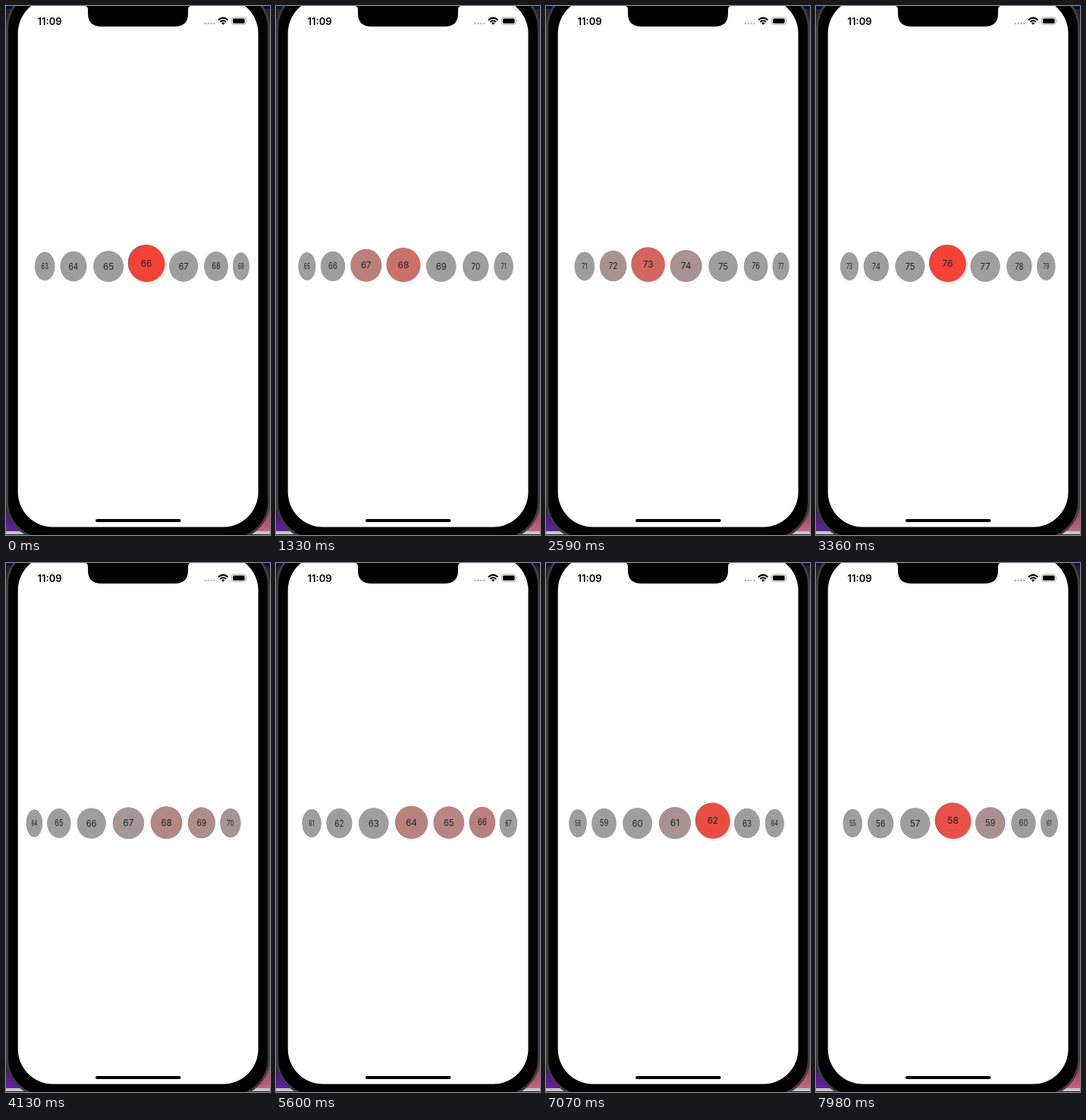
Recreate the animation shown at these times as an HTML page. Size 348 px wide and 696 px high, loop 8000 ms.

```html
<!DOCTYPE html>
<html lang="en">
<head>
<meta charset="utf-8">
<title>Wheel picker</title>
<style>
  html, body { margin: 0; width: 100%; height: 100%; overflow: hidden; background: #1c1c1f; }
  svg { display: block; width: 100vw; height: 100vh; }
  text { font-family: Inter, Roboto, sans-serif; }
  .ball text { font-size: 12px; text-anchor: middle; fill: #222; }
  .glow { fill: #e8d8d5; filter: blur(1.5px); }
</style>
</head>
<body>
<svg viewBox="0 0 348 696" xmlns="http://www.w3.org/2000/svg">
  <defs>
    <linearGradient id="purple" x2="0" y2="1">
      <stop offset="0" stop-color="#2c1646"/><stop offset="1" stop-color="#6420a4"/>
    </linearGradient>
    <linearGradient id="pink" x2="0" y2="1">
      <stop offset="0" stop-color="#50313f"/><stop offset="1" stop-color="#c8647e"/>
    </linearGradient>
  </defs>

  <!-- desktop behind the phone -->
  <rect width="348" height="696" fill="#222224"/>
  <rect width="348" height="4" fill="#0b0b50"/>
  <rect y="650" width="40" height="41" fill="url(#purple)"/>
  <rect x="308" y="640" width="40" height="51" fill="url(#pink)"/>
  <rect y="691" width="348" height="4" fill="#c9c4cc"/>

  <!-- phone -->
  <rect x="1.5" y="-20" width="345" height="721" rx="49" fill="#000" stroke="#3d3d3e" stroke-width="3"/>
  <rect x="15.7" y="-10" width="316.8" height="695.5" rx="46" fill="#fff"/>
  <path d="M104 0Q108 0 108 5V10Q108 27 126 27H222Q240 27 240 10V5Q240 0 244 0Z"/>
  <text x="41.5" y="24.5" font-size="13" font-weight="600">11:09</text>
  <g fill="#b8b8b8">
    <circle cx="262.7" cy="23" r="1.3"/><circle cx="266.6" cy="23" r="1.3"/>
    <circle cx="270.5" cy="23" r="1.3"/><circle cx="274.4" cy="23" r="1.3"/>
  </g>
  <g fill="none" stroke="#000" stroke-width="2">
    <path d="M279.9 18.4Q286.2 12.8 292.5 18.4"/>
    <path d="M282.3 21Q286.2 17.6 290.1 21"/>
  </g>
  <path d="M283.9 22.4Q286.2 20.6 288.5 22.4L286.2 24.8Z"/>
  <rect x="297.5" y="15" width="18.6" height="9.4" rx="2.8" fill="none" stroke="#a5a5a5"/>
  <rect x="299" y="16.5" width="15.6" height="6.4" rx="1.6"/>
  <path d="M317.2 18.2Q318.8 19.7 317.2 21.2Z" fill="#a5a5a5"/>
  <rect x="118" y="675" width="112.5" height="4" rx="2"/>

  <g id="wheel"></g>
</svg>
<script>
const LOOP = 8000, TICK = 70, FADE = 300;
const CENTER_X = 174, CENTER_Y = 342.5, RADIUS = 160, ANGLE = 0.315, REACH = 3.64;
const GREY = [158, 158, 158], RED = [244, 67, 54];
const SHADE = [158, 158, 158], DARK = [118, 104, 102];

// [time, item position at the middle of the wheel]
const path = [
  [0, 65.78], [630, 65.78], [980, 66.5], [1180, 67.5], [1330, 68.12],
  [1470, 68.5], [1800, 69.5], [1980, 70.5], [2145, 71.5], [2345, 72.5],
  [2555, 73.5], [2590, 73.79], [2870, 75], [3150, 75.8], [3450, 76.1],
  [3600, 74.6], [3690, 72.7], [4130, 67.25], [4230, 66.65], [4410, 66.4],
  [4830, 66.2], [5250, 66.2], [5393, 65.5], [5507, 64.5], [5600, 63.91],
  [5880, 63.1], [6160, 62.5], [6440, 62.05], [6790, 61.8], [6860, 61.8],
  [7034, 61.5], [7070, 61.08], [7190, 60.5], [7445, 59.5], [7720, 58.5],
  [7980, 57.87], [LOOP, 57.87]
];

function position(t) {
  const i = Math.max(1, path.findIndex(p => p[0] >= t));
  const [t0, a] = path[i - 1], [t1, b] = path[i];
  return a + (b - a) * (t - t0) / (t1 - t0);
}

// Each item fades linearly to its new state whenever the selection changes.
const fades = {};

function level(item, t) {
  const f = (fades[item] || []).findLast(f => f.start <= t);
  return f ? f.from + (f.to - f.from) * Math.min(1, (t - f.start) / FADE) : 0;
}

function fadeTo(item, to, start, from = level(item, start)) {
  (fades[item] ||= []).push({ start, from, to });
}

let selected = Math.round(position(0));
fadeTo(selected, 1, 0, 1);
for (let t = 0; t < LOOP; t += 5) {
  const next = Math.round(position(t));
  if (next === selected) continue;
  fadeTo(selected, 0, t);
  fadeTo(next, 1, t);
  selected = next;
}

const wheel = document.getElementById('wheel');

function add(parent, tag, className) {
  const node = document.createElementNS('http://www.w3.org/2000/svg', tag);
  if (className) node.setAttribute('class', className);
  return parent.appendChild(node);
}

function set(node, attrs) {
  for (const key in attrs) node.setAttribute(key, attrs[key]);
}

const balls = Array.from({ length: 8 }, () => {
  const group = add(wheel, 'g', 'ball');
  return {
    group,
    glow: add(group, 'circle', 'glow'),
    rim: add(group, 'circle'),
    face: add(group, 'circle'),
    label: add(group, 'text')
  };
});

const mix = (a, b, k) => `rgb(${a.map((v, i) => Math.round(v + (b[i] - v) * k))})`;

function drawBall(ball, item, offset, k) {
  const angle = offset * ANGLE, cos = Math.cos(angle);
  const x = CENTER_X + RADIUS * Math.sin(angle);
  const lift = -4 * k, r = 20.5 + 3.4 * k;
  set(ball.group, {
    transform: `translate(${x} ${CENTER_Y}) scale(${cos} ${0.75 + 0.25 * cos})`,
    visibility: 'visible'
  });
  set(ball.glow, { cx: 2 * k, cy: lift + 2.8 * k, r, opacity: Math.min(1, k * 2) });
  set(ball.rim, { cx: -0.6 * k, cy: lift - 0.6 * k, r, fill: mix(SHADE, DARK, k) });
  set(ball.face, { cx: 0.5 * k, cy: lift + 0.6 * k, r, fill: mix(GREY, RED, k) });
  set(ball.label, { y: lift + 4.2 });
  ball.label.textContent = item;
}

function draw(time) {
  const t = Math.floor(time % LOOP / TICK) * TICK;
  const middle = position(t);
  const first = Math.floor(middle - REACH + 1), last = Math.floor(middle + REACH);
  balls.forEach((ball, i) => {
    const item = first + i;
    if (item > last) set(ball.group, { visibility: 'hidden' });
    else drawBall(ball, item, item - middle, level(item, t));
  });
}

const begin = performance.now();
function loop() {
  draw(performance.now() - begin);
  requestAnimationFrame(loop);
}
loop();
</script>
</body>
</html>
```
